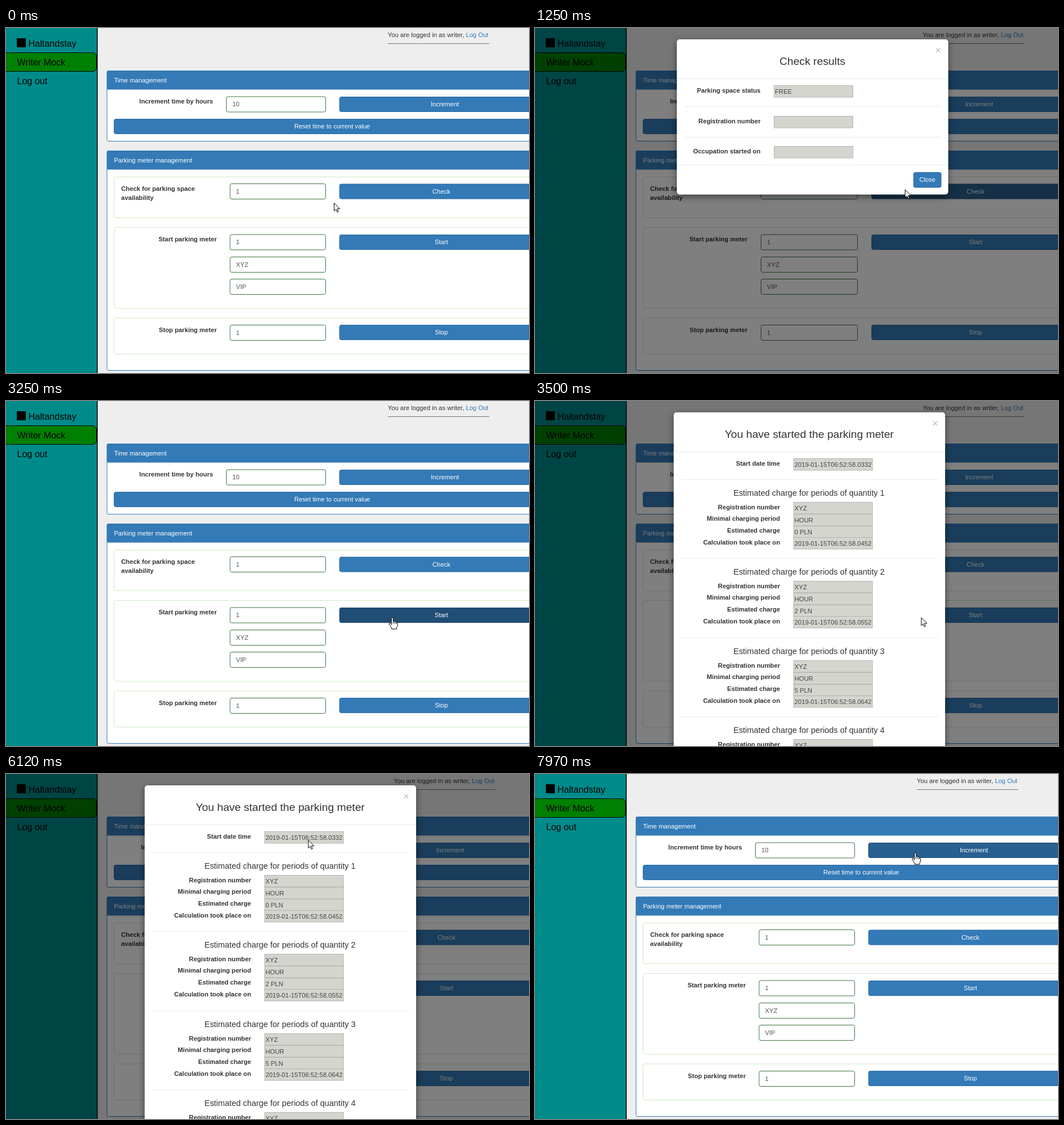
An HTML page that plays this animation: 922x608 px, repeating every 8000 ms.

```html
<!DOCTYPE html>
<html lang="en">
<head>
<meta charset="utf-8">
<title>Parking mock panel</title>
<style>
  html, body { margin: 0; width: 100%; height: 100%; overflow: hidden; background: #eee; }
  svg { display: block; width: 922px; height: 608px; }
  text { font-family: "Liberation Sans", Arial, sans-serif; font-size: 11.2px; fill: #333; white-space: pre; }
  .bold { font-weight: bold; }
  .modal { filter: drop-shadow(0 4px 6px rgba(0, 0, 0, .5)); }
</style>
</head>
<body>
<svg id="stage" viewBox="0 0 922 608"></svg>
<script>
const LOOP = 8000;
const BLUE = '#337ab7', HOVER = '#286090', ACTIVE = '#204d74';
const stage = document.getElementById('stage');

function el(parent, tag, attrs, content) {
  const node = document.createElementNS('http://www.w3.org/2000/svg', tag);
  for (const key in attrs) node.setAttribute(key, attrs[key]);
  if (content !== undefined) node.textContent = content;
  parent.appendChild(node);
  return node;
}

const group = (parent, attrs) => el(parent, 'g', attrs || {});

function fill(g, x, y, width, height, color, rx = 0) {
  return el(g, 'rect', { x, y, width, height, rx, fill: color });
}

// Box with a crisp one pixel border inside its bounds
function box(g, x, y, w, h, color, border, rx = 0) {
  return el(g, 'rect', {
    x: x + .5, y: y + .5, width: w - 1, height: h - 1, rx, fill: color, stroke: border
  });
}

function text(g, x, y, str, opt = {}) {
  const node = el(g, 'text', { x, y, 'text-anchor': opt.anchor || 'start' }, str);
  if (opt.bold) node.setAttribute('class', 'bold');
  if (opt.size) node.style.fontSize = opt.size + 'px';
  if (opt.color) node.style.fill = opt.color;
  return node;
}

const label = (g, x, y, str) => text(g, x, y, str, { anchor: 'end', bold: true });

function button(g, x, y, right, str, h = 27) {
  const shape = box(g, x, y, right - x, h, BLUE, '#2e6da4', 3);
  text(g, (x + right) / 2, y + 17.3, str, { anchor: 'middle', color: '#fff' });
  return {
    hit: (px, py) => px >= x && px < right && py >= y && py < y + h,
    paint(color) {
      shape.setAttribute('fill', color);
      shape.setAttribute('stroke', color === BLUE ? '#2e6da4' : '#204d74');
    }
  };
}

function input(g, x, y, right, str) {
  box(g, x, y, right - x, 28, '#fff', '#3c763d', 3);
  text(g, x + 11, y + 17.5, str, { color: '#555' });
}

function sidebar(g) {
  fill(g, 0, 0, 160, 608, '#008b8b');
  fill(g, 160, 0, 1.6, 608, '#000');
  el(g, 'path', {
    d: 'M0 43.5H152Q159.5 43.5 159.5 51V69Q159.5 76.5 152 76.5H0', fill: '#008000', stroke: '#000'
  });
  fill(g, 19, 18, 16, 16, '#000');
  const opt = { size: 16, color: '#000' };
  text(g, 39.5, 33, 'Haltandstay', opt);
  text(g, 19.5, 66, 'Writer Mock', opt);
  text(g, 19.5, 98.5, 'Log out', opt);
}

function panel(g, y, bottom, title) {
  box(g, 177.5, y, 800, bottom - y, '#fff', BLUE, 3);
  fill(g, 178, y, 800, 33.5, BLUE, 2);
  text(g, 190.4, y + 21, title, { color: '#fff' });
}

// wide: the layout without a scroll bar, used behind dialogs
function page(wide) {
  const g = group(stage);
  const s = wide ? 1 : 0;
  fill(g, 0, 0, 922, 608, '#eee');
  sidebar(g);

  const login = text(g, 673 + 10.5 * s, 15.5, 'You are logged in as writer, ');
  const link = el(login, 'tspan', {}, 'Log Out');
  link.style.fill = BLUE;
  fill(g, 673 + 10.5 * s, 27, 179, 1, '#777');

  panel(g, 75, 200, 'Time management');
  label(g, 365 + 3 * s, 133, 'Increment time by hours');
  input(g, 388 + 3 * s, 120.5, 564 + 5 * s, '10');
  const left = 587.5 + 5.5 * s, right = 947.5 + 12.5 * s;
  const btn = {
    increment: button(g, left, 121, 960 + 13 * s, 'Increment'),
    reset: button(g, 190, 160, 960 + 13 * s, 'Reset time to current value')
  };

  panel(g, 216, 604, 'Parking meter management');
  for (const [y, h] of [[262, 73], [351, 143.5], [510.5, 64.5]])
    box(g, 190, y, 800, h, '#fff', '#d0e9c6', 3);
  text(g, 203, 286.5, 'Check for parking space', { bold: true });
  text(g, 203, 302.5, 'availability', { bold: true });
  label(g, 371.5 + 3 * s, 376, 'Start parking meter');
  label(g, 371.5 + 3 * s, 535.5, 'Stop parking meter');
  const rows = [[274, '1'], [363.5, '1'], [403, 'XYZ'], [442, 'VIP'], [523, '1']];
  for (const [y, value] of rows) input(g, 394.5 + 3.5 * s, y, 564 + 5 * s, value);
  btn.check = button(g, left, 274.5, right, 'Check');
  btn.start = button(g, left, 364, right, 'Start');
  btn.stop = button(g, left, 523, right, 'Stop');
  return { g, btn };
}

function dialog(x, height, title) {
  const { g, btn } = page(true);
  fill(g, 0, 0, 922, 608, 'rgba(0,0,0,.5)');
  const shell = group(g, { class: 'modal' });
  fill(shell, x, 20, 478.5, height, '#fff', 5);
  text(g, x + 239, 65, title, { size: 19.2, anchor: 'middle' });
  rule(g, x, 89, 478);
  const cross = text(g, x + 461, 44.5, '×', { size: 16.8, bold: true, anchor: 'middle', color: '#000' });
  cross.style.opacity = .2;
  const onCross = (px, py) => px >= x + 454.5 && px < x + 467 && py >= 32 && py < 48;
  return { g, btn, cross, onCross };
}

function rule(g, x, y, w) {
  fill(g, x, y, w, 1, '#eaeaea');
}

function field(g, x, y, str) {
  box(g, x, y, 140, 21.5, '#d4d5cf', '#b4b5b0');
  text(g, x + 2, y + 14.8, str, { color: '#444' });
}

function checkDialog() {
  const d = dialog(250, 273.5, 'Check results');
  const rows = [['Parking space status', 'FREE'], ['Registration number', ''], ['Occupation started on', '']];
  rows.forEach(([name, value], i) => {
    const y = 101 + 53.6 * i;
    label(d.g, 397.5, y + 13, name);
    field(d.g, 421, Math.round(y), value);
    if (i < 2) rule(d.g, 262, 138 + 54 * i, 454);
  });
  rule(d.g, 250, 241, 478);
  d.close = button(d.g, 667, 254, 716.5, 'Close', 27.5);
  d.btn.check.paint(HOVER);
  return d;
}

function startDialog() {
  const d = dialog(244.5, 640, 'You have started the parking meter');
  const day = '2019-01-15T06:52:58.';
  label(d.g, 432, 114, 'Start date time');
  field(d.g, 455.5, 101, day + '0332');
  const quotes = [['0', '0452'], ['2', '0552'], ['5', '0642'], ['7', '0742']];
  quotes.forEach(([cost, stamp], k) => {
    const y = Math.round(139.3 * k);
    rule(d.g, 256, 138 + y, 455);
    text(d.g, 483, 167 + y, 'Estimated charge for periods of quantity ' + (k + 1), { size: 14.4, anchor: 'middle' });
    const rows = [
      ['Registration number', 'XYZ'], ['Minimal charging period', 'HOUR'],
      ['Estimated charge', cost + ' PLN'], ['Calculation took place on', day + stamp]
    ];
    rows.forEach(([name, value], i) => {
      label(d.g, 432, 190.6 + y + 20.8 * i, name);
      field(d.g, 455.5, 178 + y + Math.round(20.8 * i), value);
    });
  });
  return d;
}

const home = page(false);
const checked = checkDialog();
const started = startDialog();

const arrow = el(stage, 'path', {
  d: 'M0 0V14L3.3 11L5.4 16L7.5 15.1L5.4 10.2H10Z',
  fill: '#fff', stroke: '#000', 'stroke-width': 1, 'stroke-linejoin': 'round'
});
const hand = el(stage, 'path', {
  d: 'M-1.5 1.5Q-1.5 0 0 0Q1.5 0 1.5 1.5V6.8Q1.8 6 3 6Q4.2 6.1 4.3 7.4Q4.9 6.7 6 7Q7 7.3 7 8.5'
    + 'Q7.8 8 8.5 8.6Q9.2 9.2 9.2 10.5V14Q9 16 7.6 17.8V20H-1V18.2L-4.9 12.6Q-6.3 10.6 -5 9.9'
    + 'Q-3.8 9.5 -2.6 11L-1.5 12.4ZM1.5 6.8V10.5M4.3 7.4V10.8M7 8.5V11',
  fill: '#fff', stroke: '#000', 'stroke-width': 1, 'stroke-linejoin': 'round'
});

// Pointer stops: time, x, y
const path = [
  [120, 578.5, 308.5], [270, 544, 367], [460, 598, 304], [600, 640, 273], [700, 653, 287],
  [1070, 653, 287], [1250, 652.5, 285], [1560, 684, 272], [1820, 682, 269], [2000, 680.5, 267.5],
  [2060, 680.5, 267.5], [2510, 680, 382], [2690, 680, 382], [2710, 681, 381.8],
  [3810, 681, 381.8], [4150, 462, 230], [4600, 687, 40], [4890, 700.5, 36], [5060, 700.5, 36],
  [5080, 702, 38], [5250, 702, 38], [5780, 518, 112], [6010, 533, 116.5], [6120, 533, 116.5],
  [6820, 696, 37], [6920, 704, 38.5], [7320, 704, 38.5], [7670, 673, 149],
  [7730, 672, 146], [7950, 670.5, 139]
];

function pointer(t) {
  const i = path.findIndex(p => p[0] > t);
  if (i === 0) return path[0].slice(1);
  if (i < 0) return path[path.length - 1].slice(1);
  const [t0, x0, y0] = path[i - 1], [t1, x1, y1] = path[i];
  const u = (t - t0) / (t1 - t0), e = u * u * (3 - 2 * u);
  return [x0 + (x1 - x0) * e, y0 + (y1 - y0) * e];
}

function show(node, on) {
  node.style.display = on ? '' : 'none';
}

function draw(t) {
  const [x, y] = pointer(t);
  const view = t >= 1250 && t < 2060 ? checked : t >= 3500 && t < 7220 ? started : home;
  for (const v of [home, checked, started]) show(v.g, v === view);

  let link = false;
  if (view === home) {
    const pressed = t >= 1070 && t < 1250 || t >= 3250 && t < 3500;
    for (const b of Object.values(home.btn)) {
      const over = b.hit(x, y);
      b.paint(over ? (pressed ? ACTIVE : HOVER) : BLUE);
      link = link || over;
    }
  } else {
    link = view.onCross(x, y);
    view.cross.style.opacity = link ? .5 : .2;
    if (view.close) {
      const over = view.close.hit(x, y);
      view.close.paint(over ? HOVER : BLUE);
      link = link || over;
    }
  }
  show(hand, link);
  show(arrow, !link);
  (link ? hand : arrow).setAttribute('transform', `translate(${x} ${y})`);
}

const begin = performance.now();
function tick() {
  draw((performance.now() - begin) % LOOP);
  requestAnimationFrame(tick);
}
tick();
</script>
</body>
</html>
```
